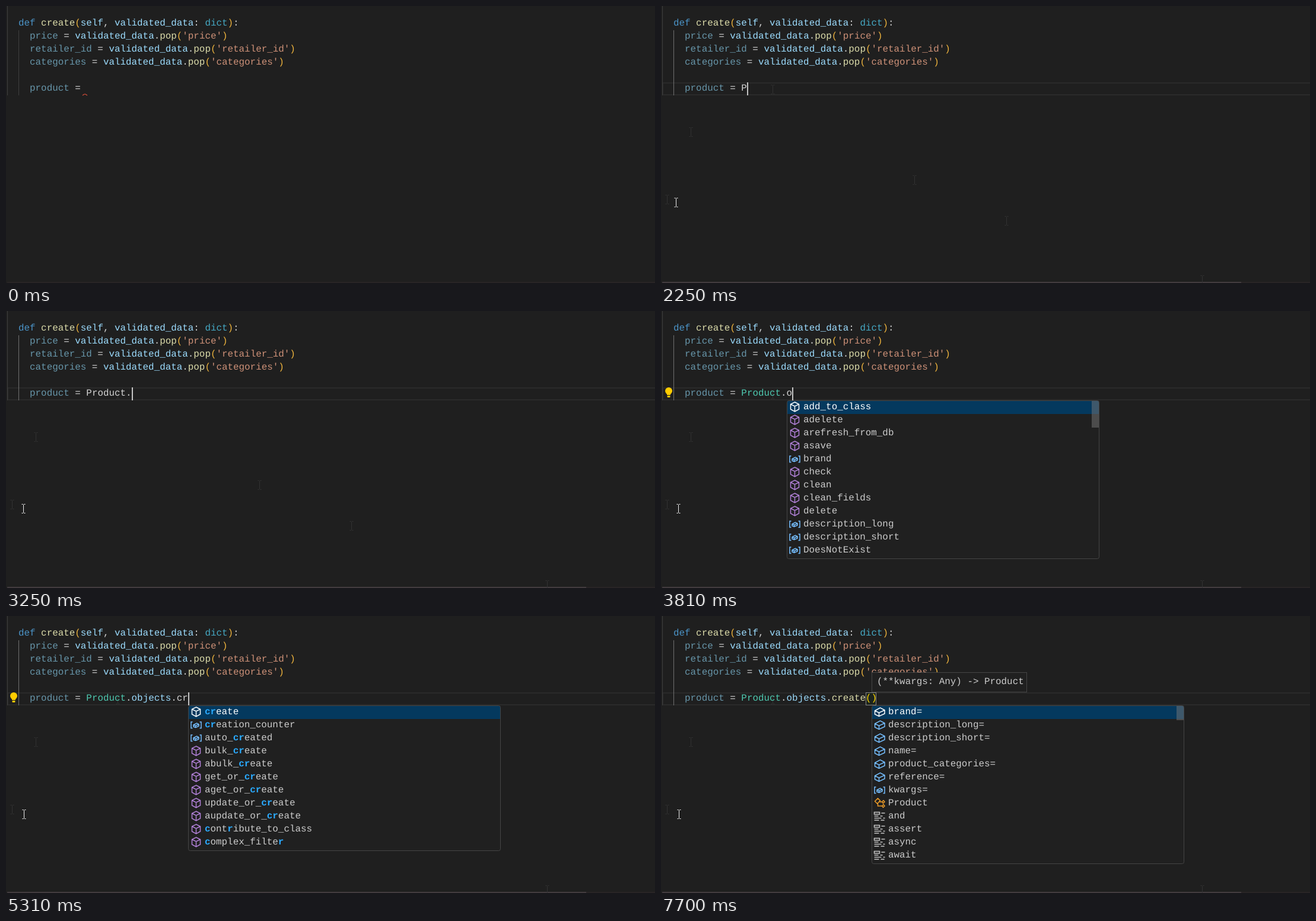
These frames come from a looping animation (1094 by 468 pixels, 8000 ms). An HTML page:

```html
<!DOCTYPE html>
<html lang="en">
<head>
<meta charset="utf-8">
<title>Code completion</title>
<style>
html, body { margin: 0; width: 100%; height: 100%; overflow: hidden; background: #1f1f1f; }
#stage { display: block; width: 1094px; height: 468px; }
text {
  font: 15.88px "Liberation Mono", "Courier New", monospace;
  font-variant-ligatures: none;
  text-rendering: geometricPrecision;
  white-space: pre;
}
.match { fill: #2aaaff; font-weight: bold; }
</style>
</head>
<body>
<svg id="stage" viewBox="0 0 1094 468"></svg>
<script>
const LOOP = 8000, LEFT = 21, CHAR = 9.53, ROW = 22, TYPED_COL = 12, MAX_ROWS = 12;
const C = {
  keyword: '#4b94c8', func: '#dcdcaa', bracket: '#efb43d', name: '#9cdcfe', type: '#45a9c4',
  unused: '#6796aa', plain: '#d4d4d4', string: '#ce9178', cls: '#4ec9b0'
};

// Each track lists [start time, value].
const typing = [
  [0, ''], [2250, 'P'], [2380, 'Pr'], [2520, 'Pro'], [2650, 'Prod'], [2780, 'Produ'],
  [2850, 'Produc'], [3050, 'Product'], [3250, 'Product.'], [3810, 'Product.o'],
  [3950, 'Product.ob'], [4080, 'Product.obj'], [4220, 'Product.obje'], [4290, 'Product.objec'],
  [4490, 'Product.object'], [4560, 'Product.objects'], [4690, 'Product.objects.'],
  [5170, 'Product.objects.c'], [5310, 'Product.objects.cr'], [5380, 'Product.objects.cre'],
  [5450, 'Product.objects.crea'], [5650, 'Product.objects.creat'],
  [5720, 'Product.objects.create'], [6250, 'Product.objects.create()']
];
const popups = [
  [0, ''], [2320, 'P'], [2450, 'Pr'], [2580, 'Pro'], [2710, 'Prod'], [2780, 'Produ'],
  [2850, 'Produc'], [3050, 'Product'], [3250, ''], [3460, 'Product.'], [3880, 'Product.o'],
  [4010, 'Product.ob'], [4150, 'Product.obj'], [4220, 'Product.obje'], [4290, 'Product.objec'],
  [4490, 'Product.object'], [4560, 'Product.objects'], [4690, ''], [4950, 'Product.objects.'],
  [5240, 'Product.objects.c'], [5310, 'Product.objects.cr'], [5380, 'Product.objects.cre'],
  [5450, 'Product.objects.crea'], [5650, 'Product.objects.creat'],
  [5720, 'Product.objects.create'], [6250, ''], [7240, 'Product.objects.create(']
];
const mouse = [
  [0, null], [130, [912, 463]], [200, [760, 420]], [270, [582, 363]], [340, [427, 294]],
  [410, [330, 236]], [480, [268, 192]], [550, [228, 164]], [620, [205, 150]], [690, [193, 144]],
  [760, [188, 141]], [960, [128, 170]], [1030, [50, 213]], [1360, [34, 250]], [1420, [18, 295]],
  [1490, [10, 327]], [1690, [14, 330]], [1760, [19, 331]], [1830, [22, 331]], [2120, [24, 331]],
  [2250, [25, 332]], [2520, [27, 334]], [3050, [28, 334]], [3250, [29, 334]],
  [4150, [29, 335]], [4820, [30, 335]]
];
const caret = [[0, 0], [900, 1], [1420, 0], [1950, 1], [6710, 0], [7240, 1], [7700, 0]];
// Faint pointer traces stay behind where the pointer paused.
const traces = [[200, 912, 463], [340, 582, 363], [410, 427, 294],
  [960, 188, 141], [1360, 50, 213], [1690, 10, 327]];

// The first letter gives the icon: class, variable, method, field or keyword.
const lists = [
  'c:Product c:ProductCategory c:ProductCategorySerializer c:ProductPriceHistory ' +
  'c:ProductPriceHistorySerializer v:product c:ListProductSerializer c:CreateProductSerializer ' +
  'v:price m:print c:property k:pass m:pow c:PermissionError',
  'm:add_to_class m:adelete m:arefresh_from_db m:asave v:brand m:check m:clean m:clean_fields ' +
  'm:delete v:description_long v:description_short v:DoesNotExist v:id m:from_db m:full_clean ' +
  'v:objects v:MultipleObjectsReturned v:product_categories m:prepare_database_save',
  'm:create v:creation_counter v:auto_created m:bulk_create m:abulk_create m:get_or_create ' +
  'm:aget_or_create m:update_or_create m:aupdate_or_create m:contribute_to_class m:check ' +
  'm:complex_filter m:count m:aggregate m:alias m:all m:annotate',
  'f:brand= f:description_long= f:description_short= f:name= f:product_categories= f:reference= ' +
  'v:kwargs= c:Product k:and k:assert k:async k:await k:break'
].map(list => list.split(' ').map(item => ({ kind: item[0], label: item.slice(2) })));
const thumbHeights = [24, 45, 30, 24];

const iconColors = { c: '#ee9d28', v: '#75beff', m: '#b180d7', f: '#75beff', k: '#c5c5c5' };
const iconPaths = {
  c: 'M-8-3L-3-8L1-4L-4 1ZM-1-2H4M-3 0V5H4M4-2L6.500-4.500L8.500-2L6 .5ZM4 5L6.500 2.500L8.500 5L6 7.500Z',
  m: 'M0-8L7-4.500V4L0 8L-7 4V-4.500ZM-7-4.500L0-1L7-4.500M0-1V8',
  f: 'M-8-2L1-7L8.500-3V3L-1 7.500L-8 4ZM-8-2L-1 1.500L8.500-3M-1 1.500V7.500',
  v: 'M-6-5H-8.500V5.500H-6M6-5H8.500V5.500H6M-4.500 0L1-3L4.500-1V2L-1 4.500L-4.500 3ZM-4.500 0L-1 1.500L4.500-1M-1 1.500V4.500',
  k: 'M-9-6.500H0V-3H-9ZM3-5H9M-9 0H-2M1 0H5M-9 3.500H3M6 3.500H9M-9 7H-1M2 7H8'
};

const colX = col => LEFT + col * CHAR;
const at = (track, t) => track.filter(step => step[0] <= t).pop()[1];
const span = (s, color) => `<tspan fill="${color}">${s}</tspan>`;
const text = (x, y, body, color = C.plain) => `<text x="${x}" y="${y}" fill="${color}">${body}</text>`;
const box = (x, y, w, h, fill, extra = '') =>
  `<rect x="${x}" y="${y}" width="${w}" height="${h}" fill="${fill}" ${extra}/>`;
const line = (d, color, width = 1) => `<path d="${d}" fill="none" stroke="${color}" stroke-width="${width}"/>`;

function popLine(name, row) {
  return text(colX(2), 33 + row * ROW, span(name, C.unused) + ' = ' + span('validated_data', C.name) +
    '.' + span('pop', C.func) + span('(', C.bracket) + span(`'${name}'`, C.string) + span(')', C.bracket));
}

const staticCode = text(LEFT, 33, span('def ', C.keyword) + span('create', C.func) + span('(', C.bracket) +
    span('self', C.name) + ', ' + span('validated_data', C.name) + ': ' + span('dict', C.type) +
    span(')', C.bracket) + ':') +
  ['price', 'retailer_id', 'categories'].map((name, i) => popLine(name, i + 1)).join('') +
  text(colX(2), 143, span('product', C.unused) + ' =');

function typedCode(s, t) {
  const [first, second = '', third = ''] = s.split('.');
  const [method, call] = third.split('(');
  const dots = s.split('.').length - 1;
  return text(colX(TYPED_COL), 143,
    span(first, t >= 3390 ? C.cls : C.plain) + (dots > 0 ? '.' : '') +
    span(second, t >= 4690 ? C.name : C.plain) + (dots > 1 ? '.' : '') +
    span(method, t >= 6050 ? C.func : C.plain) + (call ? span('()', '#ffd700') : ''));
}

// Positions of the query letters in a label, or null when it does not match.
function matches(label, query) {
  const low = label.toLowerCase(), q = query.toLowerCase();
  const whole = low.indexOf(q);
  if (whole >= 0) return [...q].map((_, i) => whole + i);
  const found = [];
  let from = 0;
  for (const ch of q) {
    const i = low.indexOf(ch, from);
    if (i < 0) return null;
    found.push(i);
    from = i + 1;
  }
  return found;
}

function popup(prefix) {
  if (!prefix) return '';
  const parts = prefix.split(/[.(]/), level = parts.length - 1, query = parts[level];
  const starts = item => item.label.toLowerCase().startsWith(query.toLowerCase());
  const items = lists[level].filter(item => matches(item.label, query))
    .sort((a, b) => starts(b) - starts(a));
  const height = Math.min(items.length, MAX_ROWS) * ROW + 3;
  const left = Math.round(colX(TYPED_COL + prefix.length));
  const rows = items.slice(0, MAX_ROWS + 1).map(({ kind, label }, i) => {
    const hits = matches(label, query);
    const body = [...label].map((ch, n) =>
      hits.includes(n) ? `<tspan class="match">${ch}</tspan>` : ch).join('');
    const icon = line(iconPaths[kind], i ? iconColors[kind] : '#fff', 1.5);
    return `<g transform="translate(13.5 ${i * ROW + 11})">${icon}</g>` +
      text(28, i * ROW + 15, body, i ? '#ccc' : '#fff');
  }).join('');
  const thumb = items.length > MAX_ROWS ? box(514, 1, 12, thumbHeights[level], '#797979', 'opacity=".5"') : '';
  return `<svg x="${left}" y="151" width="527" height="${height + 1}">` +
    box(0.5, 0.5, 526, height, '#202020', 'rx="3"') + box(1, 1, 525, ROW, '#04395e') + rows + thumb +
    box(0.5, 0.5, 526, height, 'none', 'rx="3" stroke="#454545"') + '</svg>';
}

const beam = (x, y, color) => `<g transform="translate(${x + 0.5} ${y})">` +
  line('M-3-7.500H-1L0-6.500L1-7.500H3M0-6.500V6.500M-3 7.500H-1L0 6.500L1 7.500H3', color) + '</g>';

const squiggle = (x, color, w = 10) => line(`M${x} 151l3-2h${w / 5}l3 2`, color, 1.2);

const bulb = '<circle cx="13" cy="135" r="6" fill="#fc0"/>' +
  box(10, 138, 6, 4, '#fc0') + box(10.5, 143, 5, 3, '#fc0', 'rx="1"');

const signature = box(355.5, 95.5, 261, 33, '#202020', 'stroke="#454545"') +
  text(364, 115, '(**kwargs: Any) -&gt; Product', '#ccc');

function scene(t) {
  const typed = at(typing, t), pointer = at(mouse, t), list = at(popups, t);
  const active = t >= 900, called = t >= 6250;
  const caretX = Math.round(colX(TYPED_COL + typed.length - (called ? 1 : 0)));
  let out = box(0, 0, 1094, 468, '#1f1f1f') + box(2, 466, 1092, 2, '#292526');
  if (t >= 130) out += box(2, 466, 976, 2, '#423c3f');
  if (active) out += box(3, 130, 1100, 20, 'none', 'stroke="#2a2a2a" stroke-width="2"');
  out += box(2, 0, 1, 151, '#404040') + box(21, 41, 1, 110, active ? '#707070' : '#404040');
  out += traces.filter(trace => t >= trace[0]).map(([, x, y]) => beam(x, y, '#323232')).join('');
  if (called) out += box(345.5, 129.5, 17, 21, '#1d241d', 'stroke="#888"');
  out += staticCode + typedCode(typed, t);
  if (t < 2250) out += squiggle(129, '#e0503a');
  if (t >= 2580 && t < 3250) out += squiggle(caretX - 6, '#c9822b', 5);
  if (t >= 4690 && t < 4950) out += squiggle(284, '#b5443a', 5);
  if (t >= 3390 && !called) out += bulb;
  if (at(caret, t)) out += box(caretX, 129, 2, ROW, '#c4c4c4');
  if (t >= 6510) out += signature;
  out += popup(list);
  if (pointer) out += beam(...pointer, '#f0f0f0');
  return out;
}

const stage = document.getElementById('stage');
let shown = '';
function tick() {
  const markup = scene(performance.now() % LOOP);
  if (markup !== shown) stage.innerHTML = shown = markup;
  requestAnimationFrame(tick);
}
tick();
</script>
</body>
</html>
```
